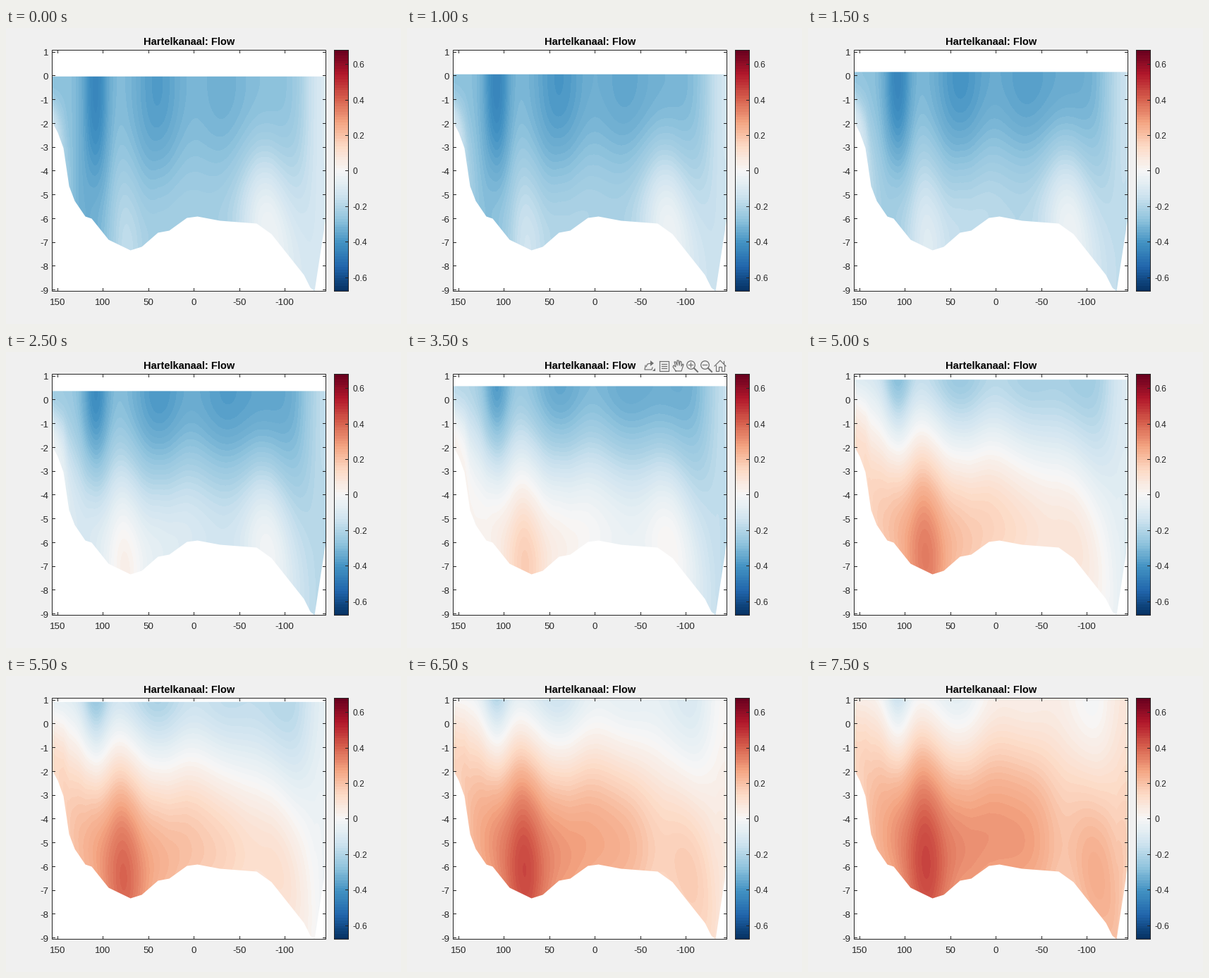
A matplotlib script that plays this animation: 560x420 px, repeating every 8 s.

```python
import numpy as np
import matplotlib.pyplot as plt
from matplotlib.animation import FuncAnimation
from matplotlib.patches import Circle, Polygon, Rectangle

W, H = 560, 420
FRAMES, INTERVAL = 16, 500
LEFT, RIGHT, TOP, BOTTOM = 65, 453, 31, 373
BAR_L, BAR_R = 465, 485
LIMIT, BANDS = 0.68, 90
LAST_STEP, TIDE_PERIOD = 14, 32
INK, ICON = "#262626", "#707070"
PX = 0.72  # points per pixel at 100 dpi

plt.rcParams["font.family"] = "Liberation Sans"

BED = 0.5 + np.array([
    (65, 133), (73, 148), (81, 170), (89, 224), (97, 245), (112, 267),
    (121, 270), (145, 300), (176, 315), (192, 310), (215, 290), (231, 287),
    (256, 269), (271, 267), (303, 273), (355, 277), (376, 292), (422, 350),
    (431, 368), (437, 373), (454, 262),
])

cols = np.arange(LEFT, RIGHT + 1) + 0.5
rows = (np.arange(TOP, BOTTOM + 1) + 0.5)[:, None]
across = (cols - LEFT) / (RIGHT - LEFT)
bed_y = np.interp(cols, BED[:, 0], BED[:, 1])
cmap = plt.get_cmap("RdBu_r")


def bump(center, width, height):
    return height * np.exp(-0.5 * ((cols - center) / width) ** 2)


# Strongest outflow at the surface: a few streams, fading to the right bank.
top_low = (-0.28 + bump(127, 14, -0.17) + bump(215, 28, -0.12)
           + bump(310, 35, -0.10) + bump(395, 35, -0.07)
           + 0.14 / (1 + np.exp((425 - cols) / 10)))
top_swing = 0.17 + bump(330, 70, 0.12)
top_lag = 4.5 * across ** 0.7

# Mean and swing of the flow along the bed, where the tide turns earlier.
bed_mean = (0.03 + bump(168, 18, 0.10) + bump(105, 30, -0.09)
            + bump(400, 45, 0.08))
bed_swing = (0.27 + bump(140, 45, 0.09) + bump(66, 18, -0.13)
             + bump(368, 26, -0.14))
bed_lag = -3.3 + 7.5 * across ** 2


def tide(step, lag):
    return -np.cos(2 * np.pi * (step - lag) / TIDE_PERIOD)


def surface_y(step):
    return 30.7 + 24.7 * (1 - np.cos(2 * np.pi * (15 - step) / 44))


def band_colors(v):
    """Map speeds to colours in discrete contour bands."""
    band = np.floor((v + LIMIT) / (2 * LIMIT) * BANDS)
    return cmap((band + 0.5) / BANDS)[..., :3]


def flow_image(step):
    u = step / LAST_STEP
    surface = surface_y(step)
    depth = np.clip((rows - surface) / (bed_y - surface), 0, 1)
    power = 0.95 + 1.9 * (1 - u) ** 2 + across * u
    shape = np.sin(np.pi / 2 * (1 + 0.2 * u ** 2) * depth) ** power
    top = top_low + top_swing * (1 + tide(step, top_lag))
    low = bed_mean + bed_swing * tide(step, bed_lag)
    image = band_colors(top + (low - top) * shape)
    cover = np.clip(rows + 0.5 - surface, 0, 1)[..., None]
    return 1 + (image - 1) * cover


fig = plt.figure(figsize=(W / 100, H / 100), dpi=100, facecolor="#f0f0f0")
ax = fig.add_axes([0, 0, 1, 1])
ax.set_xlim(0, W)
ax.set_ylim(H, 0)
ax.axis("off")


# Straight lines snap to the middle of the pixel whose index is given.
def line(xs, ys, color=INK, width=1.0):
    return ax.plot(xs, ys, color=color, lw=width * PX, zorder=5)[0]


def label(x, y, text, size, **kw):
    ax.text(x, y, text, fontsize=size * PX, va="baseline",
            **{"color": INK, **kw})


def frame_box(x0, x1):
    ax.add_patch(Rectangle((x0, TOP), x1 - x0, BOTTOM - TOP,
                           fill=False, ec=INK, lw=PX, zorder=5))


def place_image(data, x0, x1):
    return ax.imshow(data, extent=(x0, x1 + 1, BOTTOM + 1, TOP),
                     interpolation="nearest", aspect="auto", zorder=1)


# Plot area
flow = place_image(flow_image(0), LEFT, RIGHT)
ax.add_patch(Polygon(
    np.vstack([BED, [(RIGHT + 1, BOTTOM + 1), (LEFT, BOTTOM + 1)]]),
    fc="white", ec="none", zorder=2))
frame_box(LEFT, RIGHT)
label(259.6, 24, "Hartelkanaal: Flow", 14.67, ha="center", weight="bold",
      color="black")

for value in range(150, -101, -50):
    x = np.floor(266.5 - 1.29 * value)
    line([x, x], [BOTTOM, BOTTOM - 4])
    line([x, x], [TOP, TOP + 4])
    label(x, 393, str(value), 13.33, ha="center")
for value in range(1, -10, -1):
    y = 67.8 - 33.75 * value
    for start, end in ((LEFT, LEFT + 4), (RIGHT, RIGHT - 4)):
        line([start, end], [np.floor(y)] * 2)
    label(60, y + 5.3, str(value), 13.33, ha="right")

# Colour bar
place_image(band_colors(np.linspace(LIMIT, -LIMIT, 343)[:, None] * 0.999),
            BAR_L, BAR_R)
frame_box(BAR_L, BAR_R)
for i in range(-3, 4):
    y = np.floor(202.8 - 50.4 * i)
    line([BAR_R, BAR_R - 4], [y, y])
    label(491, y + 5, f"{i / 5:g}", 12, ha="left")


def toolbar():
    """Small axes tools: export, notes, pan, zoom in, zoom out, home."""
    parts = []

    def stroke(*points, width=1.2):
        parts.append(line(*zip(*points), ICON, width))

    def solid(*points):
        parts.append(ax.add_patch(Polygon(points, fc=ICON, ec="none")))

    stroke((338, 19), (337, 25), (347, 25), (348, 22))
    stroke((339, 21), (341, 17), (346, 16))
    solid((345, 12), (350, 16), (345, 20))
    solid((348, 27), (352, 27), (352, 23))

    stroke((358, 13), (371, 13), (371, 27), (358, 27), (358, 13))
    for y in (17, 20, 23):
        stroke((361, y), (368, y))

    stroke((381, 27), (377, 21), (378, 19), (381, 21), (379, 14), (381, 14),
           (383, 19), (383, 12), (385, 12), (386, 19), (387, 13), (389, 14),
           (389, 20), (391, 17), (392, 18), (389, 27), (381, 27))

    for x in (402, 422):
        parts.append(ax.add_patch(Circle((x + 0.5, 18.5), 5.8, fill=False,
                                         ec=ICON, lw=1.3 * PX)))
        stroke((x + 5, 23), (x + 10, 28), width=2)
        stroke((x - 3, 18), (x + 3, 18))
    stroke((402, 15), (402, 21))

    stroke((436, 20), (444, 12), (452, 20))
    stroke((438, 19), (438, 27), (442, 27), (442, 21), (446, 21),
           (446, 27), (450, 27), (450, 19))
    stroke((449, 13), (449, 17))
    return parts


tools = toolbar()


def update(i):
    flow.set_data(flow_image(max(i - 1, 0)))
    for part in tools:
        part.set_visible(i in (7, 8))
    return [flow, *tools]


anim = FuncAnimation(fig, update, frames=FRAMES, interval=INTERVAL,
                     repeat=True, repeat_delay=0)
plt.show()
```
